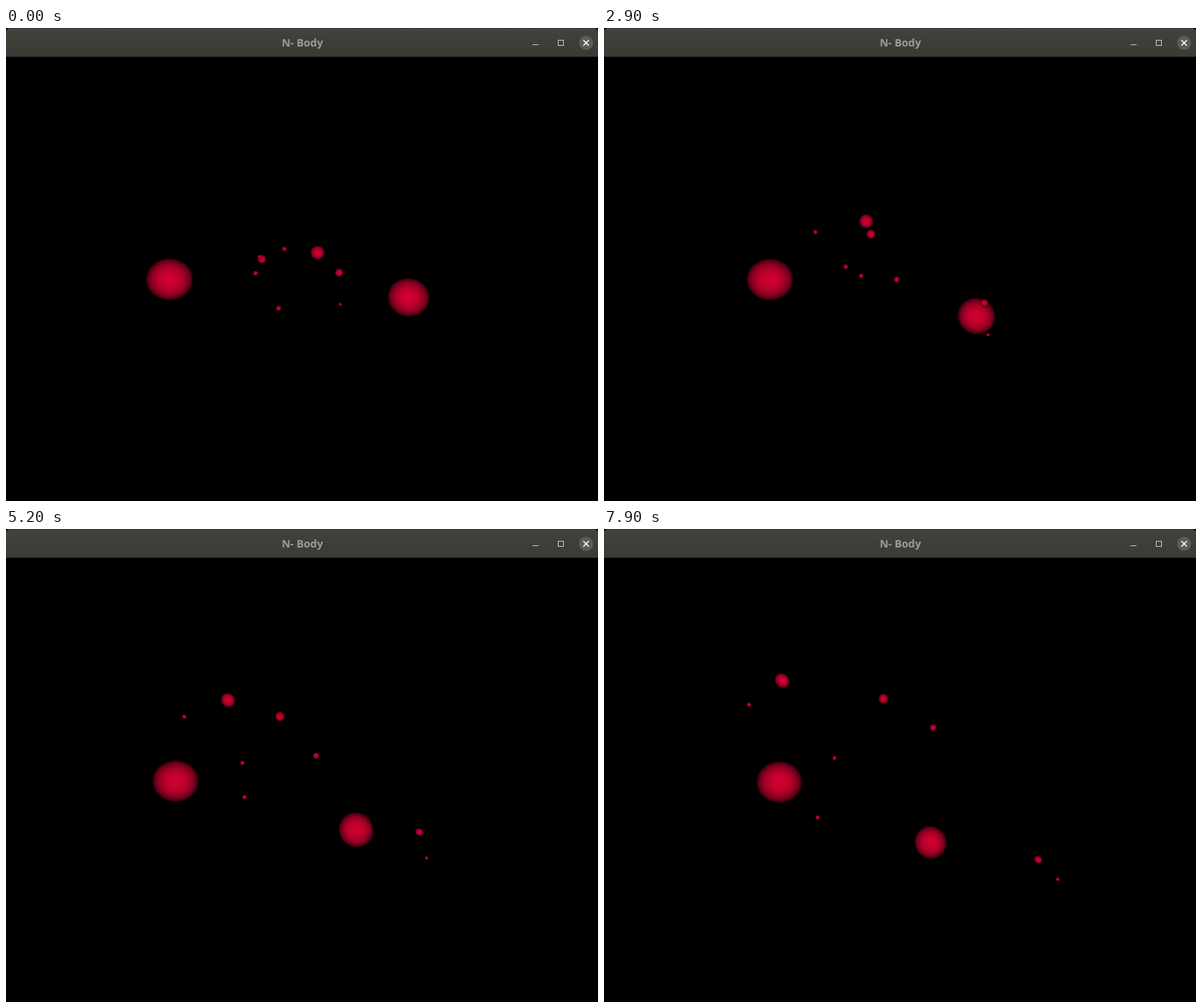
An HTML page with a canvas that plays this animation: 797 by 638 pixels, repeating every 8000 ms.

```html
<!DOCTYPE html>
<html lang="en">
<head>
<meta charset="utf-8">
<title>N- Body</title>
<style>
  html, body { margin: 0; width: 100%; height: 100%; overflow: hidden; background: #000; }
  .stage { position: relative; width: 797px; height: 638px; overflow: hidden; background: #000; }
  canvas { position: absolute; left: 0; top: 0; }
  .bar {
    position: absolute; left: 0; top: 0; width: 797px; height: 39px; box-sizing: border-box;
    border-radius: 5px 5px 0 0;
    border-top: 1px solid #2b2a27; border-bottom: 1px solid #2e2d29;
    background: linear-gradient(#4b4a45 0 1px, #42423d 1px, #3b3b36);
  }
  .title {
    position: absolute; left: 0; top: 10px; width: 798px; text-align: center;
    font: bold 14.3px/20px "Open Sans", "Noto Sans", sans-serif; color: #9d9c94;
  }
  .buttons { position: absolute; left: 0; top: 0; }
</style>
</head>
<body>
<div class="stage">
  <canvas id="space" width="797" height="638"></canvas>
  <div class="bar"></div>
  <div class="title">N- Body</div>
  <svg class="buttons" width="797" height="39" fill="none">
    <path d="M709 22.5h8" stroke="#c9c8c1"/>
    <rect x="743.5" y="16.5" width="7" height="7" stroke="#c9c8c1"/>
    <circle cx="781" cy="20" r="9.5" fill="#5c5b56"/>
    <path d="M777.3 16.3l7.4 7.4m0-7.4l-7.4 7.4" stroke="#fff" stroke-width="1.5"/>
  </svg>
</div>
<script>
const LOOP = 8000, STEP = 100;
const VIEW = { x: 398.5, y: 338.5 };
const STRETCH = 3.9e-6;
const KNOTS = [0, 1700, 2900, 5200, 6200, 7900];
const LAST = KNOTS.length - 1;

// x and y at each knot, radius at the first and last knot; far bodies first
const bodies = [
  { x: [220, 221.8, 223.3, 228.2, 230.8, 236], y: [339, 339.1, 339.3, 340, 340.4, 341.2], r: [28.2, 27.8] },
  { x: [542, 517.2, 501.4, 471.4, 459.3, 439.7], y: [363.3, 379, 388.6, 405.8, 412.4, 422.8], r: [26, 21.5] },
  { x: [419.5, 380.2, 353, 299, 276.2, 240], y: [303, 277.2, 260.8, 230.8, 219.6, 204.4], r: [9.4, 9.3] },
  { x: [344.5, 354, 359.4, 368.8, 371.9, 376.2], y: [311.8, 291.2, 278, 253, 243.1, 229], r: [5.8, 6.6] },
  { x: [341.5, 307.5, 284.6, 240, 222.2, 195.2], y: [309, 288.6, 275.2, 253, 245.5, 237], r: [3, 2.8] },
  { x: [374.8, 357.8, 346.2, 321, 309.2, 287.6], y: [298, 320, 334.2, 361.5, 372.3, 389], r: [3.2, 2.9] },
  { x: [336, 329.7, 325.5, 318.2, 315.1, 310.3], y: [330.8, 325.2, 322, 315.5, 313, 309], r: [3.4, 2.9] },
  { x: [366.9, 382.9, 394.2, 417.5, 427.4, 443], y: [378, 355.7, 339.3, 305.8, 291.5, 268], r: [3.6, 4.6] },
  { x: [448.5, 485, 512, 556.5, 569.2, 584.6], y: [330, 353.3, 371, 408.8, 423.7, 446], r: [5.5, 4.9] },
  { x: [450.2, 490.2, 517.2, 566.2, 585, 610.8], y: [372.5, 397.6, 413.8, 443.8, 455.4, 472.5], r: [2.2, 2.4] }
];

const ctx = document.getElementById("space").getContext("2d");

// Lit sphere: brightness follows the surface slope
const shade = ctx.createRadialGradient(0, 0, 0, 0, 0, 1);
for (let i = 0; i <= 16; i++) {
  const angle = i / 16 * Math.PI / 2;
  const light = 0.06 + 0.94 * Math.max(0, Math.cos(angle)) ** 1.1;
  shade.addColorStop(Math.sin(angle), `rgb(${208 * light}, 0, ${48 * light})`);
}

// Parabola through three neighbouring knots
function parabola(values, first, t) {
  const near = [first, first + 1, first + 2];
  return near.reduce((sum, i) =>
    sum + near.reduce((w, j) => j === i ? w : w * (t - KNOTS[j]) / (KNOTS[i] - KNOTS[j]), values[i]), 0);
}

// Smooth path: blend the parabolas on either side of a segment
function along(values, t) {
  let i = 0;
  while (i < LAST - 1 && t >= KNOTS[i + 1]) i++;
  const blend = (t - KNOTS[i]) / (KNOTS[i + 1] - KNOTS[i]);
  const before = parabola(values, Math.max(i - 1, 0), t);
  const after = parabola(values, Math.min(i, LAST - 2), t);
  return before + (after - before) * blend;
}

// Perspective lengthens a sphere away from the middle of the view
function drawBody(body, t) {
  const x = along(body.x, t), y = along(body.y, t);
  const r = body.r[0] + (body.r[1] - body.r[0]) * t / KNOTS[LAST];
  const dx = x - VIEW.x, dy = y - VIEW.y;
  ctx.save();
  ctx.translate(x, y);
  ctx.rotate(Math.atan2(dy, dx));
  ctx.scale(r * (1 + STRETCH * (dx * dx + dy * dy)), r);
  ctx.fillStyle = shade;
  ctx.beginPath();
  ctx.arc(0, 0, 1, 0, Math.PI * 2);
  ctx.fill();
  ctx.restore();
}

const start = performance.now();
function frame() {
  const elapsed = Math.max(0, performance.now() - start) % LOOP;
  const t = Math.floor(elapsed / STEP) * STEP;
  ctx.clearRect(0, 0, 797, 638);
  bodies.forEach(body => drawBody(body, t));
  requestAnimationFrame(frame);
}
frame();
</script>
</body>
</html>
```
